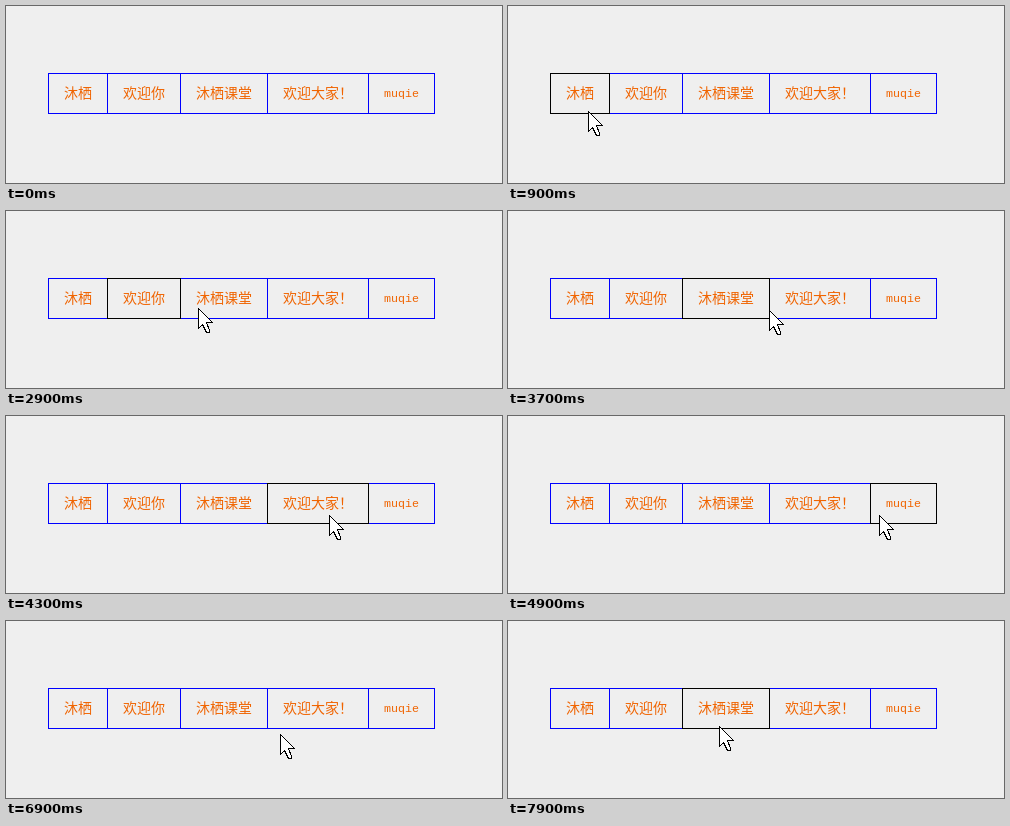
An HTML page for the animation above (8000 ms loop, 496 px wide and 177 px high).

```html
<!DOCTYPE html>
<html lang="zh">
<head>
<meta charset="utf-8">
<title>Hover borders</title>
<style>
  html, body { margin: 0; width: 100%; height: 100%; overflow: hidden; background: #efefef; }
  ul { position: absolute; left: 42px; top: 67px; margin: 0; padding: 0; display: flex; list-style: none; }
  li {
    position: relative; box-sizing: border-box; height: 41px; padding: 0 15px;
    border: 1px solid #00f; color: #f06400; white-space: nowrap;
    font: 300 14px/37px "Noto Sans CJK SC", "Noto Sans CJK", sans-serif;
  }
  li + li { margin-left: -1px; }
  li.latin { width: 67px; font: 11.67px/41px "Liberation Mono", monospace; }
  li.hover { border-color: #000; z-index: 1; }
  svg { position: absolute; left: 0; top: 0; z-index: 2; overflow: visible; }
</style>
</head>
<body>
<ul>
  <li>沐栖</li><li>欢迎你</li><li>沐栖课堂</li><li>欢迎大家！</li><li class="latin">muqie</li>
</ul>
<svg id="cursor" width="16" height="26" shape-rendering="crispEdges">
  <path d="M.5 .5V20.5L4.5 16.5L8.5 24.5H11.5V22.5L8.5 14.5H14.5Z" fill="#fff" stroke="#000"/>
</svg>
<script>
const LOOP = 8000, STEP = 200, OFFSET = 100;

// Key points of the pointer: [ms, x, y]
const path = [
  [500, 96, 149], [900, 80, 105], [1700, 76, 97], [2900, 192, 97],
  [3700, 261, 99], [4700, 364, 99], [4900, 371, 99], [5300, 405, 97],
  [5900, 387, 96], [6100, 365, 93], [6300, 309, 87], [6900, 274, 113],
  [7300, 258, 177], [7500, 257, 177], [7700, 253, 150], [7900, 211, 105]
];

const list = document.querySelector("ul");
const cells = [...list.children];
const cursor = document.getElementById("cursor");

function pointAt(t) {
  const next = path.findIndex(p => p[0] >= t);
  const [t1, x1, y1] = path[next];
  if (next === 0) return { x: x1, y: y1 };
  const [t0, x0, y0] = path[next - 1];
  const k = (t - t0) / (t1 - t0);
  return { x: Math.round(x0 + (x1 - x0) * k), y: Math.round(y0 + (y1 - y0) * k) };
}

// The highlight trails the pointer sideways by one step.
function hoveredCell(t) {
  if (pointAt(t).y >= list.offsetTop + list.offsetHeight) return undefined;
  const x = pointAt(t - STEP).x - list.offsetLeft;
  return cells.findLast(cell => cell.offsetLeft <= x);
}

function draw(now) {
  const t = Math.floor((now % LOOP - OFFSET) / STEP) * STEP + OFFSET;
  const { x, y } = pointAt(t);
  cursor.style.display = t < path[0][0] ? "none" : "block";
  cursor.style.transform = `translate(${x}px, ${y}px)`;

  const active = hoveredCell(t);
  for (const cell of cells) cell.classList.toggle("hover", cell === active);
}

const start = performance.now();
function tick() {
  draw(performance.now() - start);
  requestAnimationFrame(tick);
}
tick();
</script>
</body>
</html>
```
